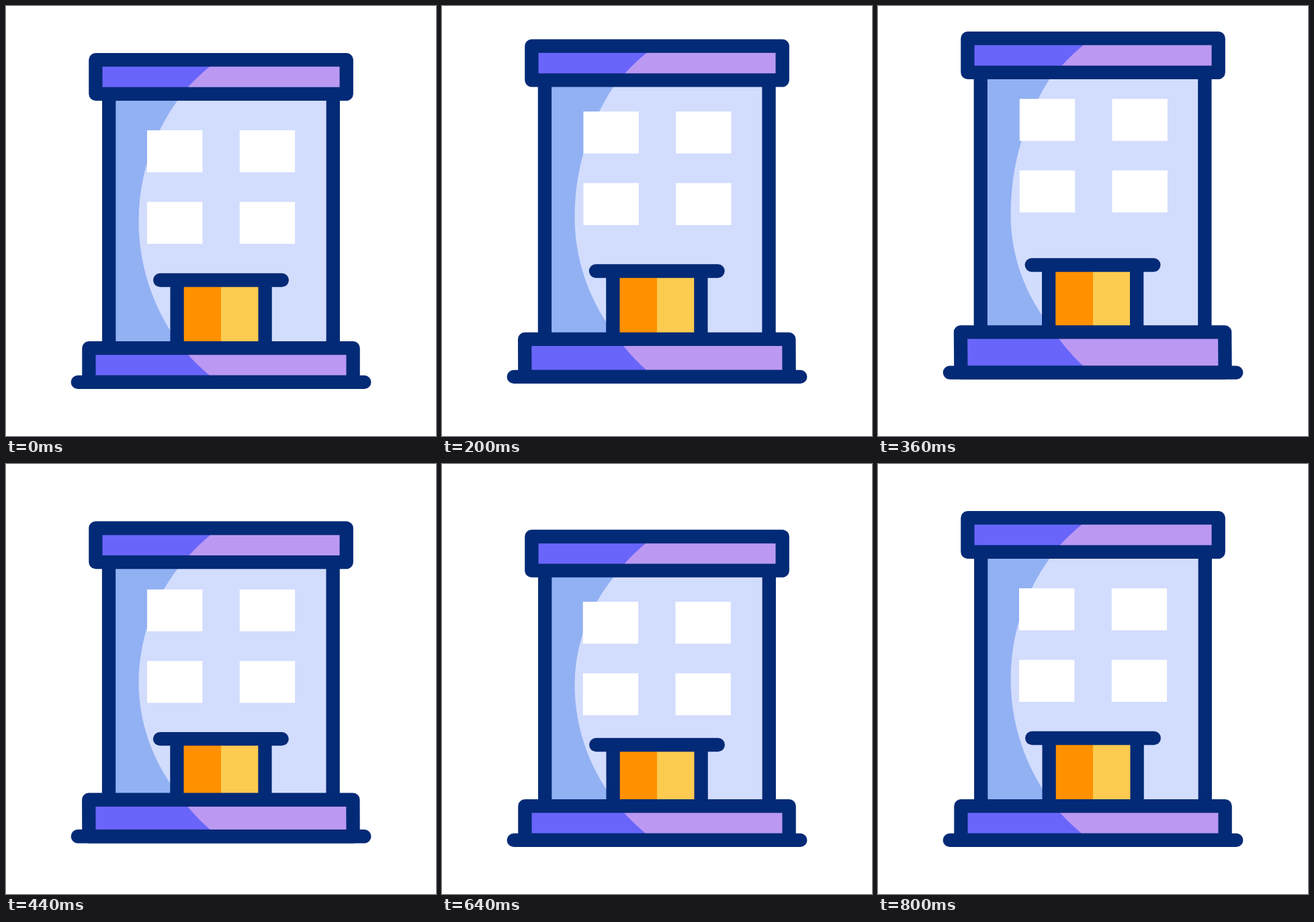
An HTML page for the animation above (1.48 s loop, 640 px wide and 640 px high).

```html
<!DOCTYPE html>
<html lang="en">
<head>
<meta charset="utf-8">
<title>Bouncing building</title>
<style>
  html, body { margin: 0; width: 100%; height: 100%; overflow: hidden; background: #fff; }
  svg { display: block; width: 100%; height: 100%; }
  .line { fill: none; stroke: #032a76; stroke-width: 20.3; stroke-linecap: round; stroke-linejoin: round; }
  .butt { stroke-linecap: butt; }
</style>
</head>
<body>
<svg viewBox="0 0 640 640">
  <path id="wall" fill="#92b1f3"/>
  <path id="wallLight" fill="#d2dcfd"/>
  <path id="panes" fill="#fff"/>
  <path id="sides" class="line butt"/>
  <path id="doorLeft" fill="#ff9101"/>
  <path id="doorRight" fill="#fdcb50"/>
  <path id="posts" class="line butt"/>
  <path id="canopy" class="line"/>
  <path id="plinth" fill="#6965fa"/>
  <path id="plinthLight" fill="#bb99f2"/>
  <path id="plinthLine" class="line"/>
  <path id="roof" fill="#6965fa"/>
  <path id="roofLight" fill="#bb99f2"/>
  <path id="roofLine" class="line"/>
  <path id="ground" class="line"/>
</svg>
<script>
const LOOP = 1480, STEP = 40;
const KEYS = [80, 320, 520, 800]; // rest, stretched, squashed, rest

const smooth = x => x * x * (3 - 2 * x);
const set = (id, d) => document.getElementById(id).setAttribute('d', d);
const box = (x1, y1, x2, y2) => `M${x1} ${y1}H${x2}V${y2}H${x1}Z`;

// Returns a function giving the offset between the stretched and squashed extremes.
function poseAt(t) {
  if (t <= KEYS[0] || t >= KEYS[3]) return () => 0;
  const i = t < KEYS[1] ? 0 : t < KEYS[2] ? 1 : 2;
  const k = smooth((t - KEYS[i]) / (KEYS[i + 1] - KEYS[i]));
  return (high, low) => {
    const v = [0, high, low, 0];
    return v[i] + (v[i + 1] - v[i]) * k;
  };
}

function draw(t) {
  const off = poseAt(t);
  const roofY = 80.1 + off(-41, 46);
  const eaveY = roofY + 50.7;
  const paneY = 185 + off(-56, 33);
  const canopyY = 408 + off(-27, 16.5);
  const baseY = 509.1 + off(-26.5, 0);
  const groundY = 559.9 + off(-16, 0);
  const midY = 320 + off(-12, 14);
  const dx = off(-0.5, 0);
  const left = 153.2 + dx, right = 486.8 + dx;

  set('wall', box(left, eaveY, right, baseY));
  const top = eaveY + 9.2, bottom = baseY - 9.1;
  const ry = h => 307 * h / 180;
  set('wallLight', `M255.8 ${top}A307 ${ry(midY - top)} 0 0 0 197.5 ${midY}` +
    `A307 ${ry(bottom - midY)} 0 0 0 255.8 ${bottom}V${baseY}H${right}V${eaveY}H255.8Z`);

  let panes = '';
  for (const x of [210, 347.7])
    for (const y of [0, 106.5]) {
      const px = x + off(0.9, -0.4), py = paneY + y;
      panes += box(px, py, px + 82.4, py + 62.4);
    }
  set('panes', panes);
  set('sides', `M${left} ${eaveY}V${baseY}M${right} ${eaveY}V${baseY}`);

  const postL = 254.6 + dx, postR = 385.6 + dx;
  set('doorLeft', box(postL, canopyY, 320, baseY));
  set('doorRight', box(320, canopyY, postR, baseY));
  set('posts', `M${postL} ${canopyY}V${baseY}M${postR} ${canopyY}V${baseY}`);
  set('canopy', `M${229.2 + dx} ${canopyY}H${410.8 + dx}`);

  const plinth = `M123.4 ${groundY}L${123.4 + dx} ${baseY}H${516.6 + dx}L516.6 ${groundY}Z`;
  set('plinth', plinth);
  set('plinthLine', plinth);
  set('plinthLight', `M${270 + off(-1.7, 0)} ${baseY + 9}` +
    `A306 306 0 0 0 ${304 + off(2, 0)} ${groundY - 9.2}H516.6L${516.6 + dx} ${baseY + 9}Z`);

  const roof = box(133.4, roofY, 506.7, eaveY);
  set('roof', roof);
  set('roofLine', roof);
  set('roofLight', `M${270 + off(3, 0.7)} ${eaveY - 9.2}` +
    `A306 306 0 0 1 ${304 + off(2.7, 0.5)} ${roofY + 9.3}H506.7V${eaveY - 9.2}Z`);

  set('ground', `M106.8 ${groundY}H533.3`);
}

const start = performance.now();
function tick() {
  const t = (performance.now() - start + 0.5) % LOOP;
  draw(Math.floor(t / STEP) * STEP);
  requestAnimationFrame(tick);
}
tick();
</script>
</body>
</html>
```
